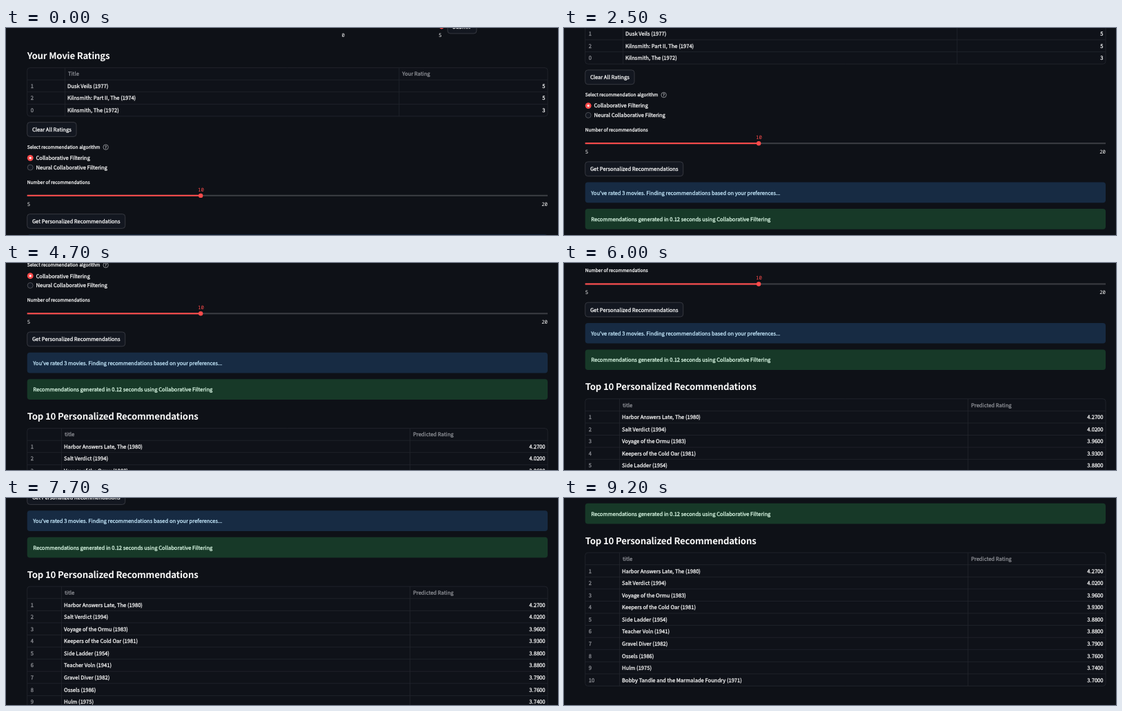
Animation, 800 px wide and 300 px high, one loop 9.9 s. Source, as an HTML page with a canvas:

```html
<!DOCTYPE html>
<html lang="en">
<head>
<meta charset="utf-8">
<title>Movie recommendations</title>
<style>
  html, body { margin: 0; width: 100%; height: 100%; overflow: hidden; background: #0e1117; }
  canvas { display: block; width: 800px; height: 300px; }
</style>
</head>
<body>
<canvas id="stage" width="800" height="300"></canvas>
<script>
const ctx = document.getElementById("stage").getContext("2d");

const LOOP = 9900, STEP = 100;
const SANS = '"Noto Sans CJK SC", "Noto Sans CJK JP", "Noto Sans CJK KR", "Noto Sans CJK TC", "Noto Sans CJK", "Open Sans", sans-serif';
const MONO = '"Noto Sans Mono", "DejaVu Sans Mono", monospace';
const BG = "#0e1117", PANEL = "#131720", WHITE = "#fafafa", MUTED = "#909298";
const RED = "#ff4b4b", LINE = "#22252d", EDGE = "#3a3d45";
const BODY = 7.59, SMALL = 6.64, ROW = 17.57;
const LEFT = 30.7, RIGHT = 785;

const rated = [
  ["1", "Dusk Veils (1977)", "5"],
  ["2", "Kilnsmith: Part II, The (1974)", "5"],
  ["0", "Kilnsmith, The (1972)", "3"]
];
const picks = [
  ["Harbor Answers Late, The (1980)", 4.27],
  ["Salt Verdict (1994)", 4.02],
  ["Voyage of the Ormu (1983)", 3.96],
  ["Keepers of the Cold Oar (1981)", 3.93],
  ["Side Ladder (1954)", 3.88],
  ["Teacher Voln (1941)", 3.88],
  ["Gravel Diver (1982)", 3.79],
  ["Ossels (1986)", 3.76],
  ["Hulm (1975)", 3.74],
  ["Bobby Tandle and the Marmalade Foundry (1971)", 3.7]
].map(([title, score], i) => [String(i + 1), title, score.toFixed(4)]);

// Scroll position: [time in ms, offset in px]
const keys = [
  [600, 0], [2500, 75.7], [3800, 136.4], [4700, 169.6],
  [6000, 212.4], [7700, 281], [8600, 315.3], [9200, 330]
];

function slope(i) {
  const a = keys[Math.max(i - 1, 0)], b = keys[Math.min(i + 1, keys.length - 1)];
  return (b[1] - a[1]) / (b[0] - a[0]);
}

function scrollAt(t) {
  const last = keys.length - 1;
  if (t <= keys[0][0]) return 0;
  if (t >= keys[last][0]) return keys[last][1];
  const i = keys.findIndex(k => k[0] > t) - 1;
  const [t0, y0] = keys[i], [t1, y1] = keys[i + 1];
  const d = t1 - t0, u = (t - t0) / d, v = 1 - u;
  return y0 * v * v * (1 + 2 * u) + y1 * u * u * (3 - 2 * u)
    + d * u * v * (slope(i) * v - slope(i + 1) * u);
}

// y is the middle of the capitals; a thin outline strengthens small type
function text(str, x, y, { color = WHITE, size = BODY, weight = 400, family = SANS, align = "left", spacing = 0, outline = 0.28 } = {}) {
  ctx.font = `${weight} ${size}px ${family}`;
  ctx.letterSpacing = spacing + "px";
  ctx.textRendering = "geometricPrecision";
  ctx.textAlign = align;
  ctx.fillStyle = ctx.strokeStyle = color;
  const base = y + size * 0.375;
  ctx.fillText(str, x, base);
  if (outline) {
    ctx.lineWidth = outline;
    ctx.lineJoin = "round";
    ctx.strokeText(str, x, base);
  }
}

function box(x, y, w, h, fill, stroke) {
  ctx.beginPath();
  ctx.roundRect(x, y, w, h, 4);
  if (fill) { ctx.fillStyle = fill; ctx.fill(); }
  if (stroke) { ctx.strokeStyle = stroke; ctx.lineWidth = 0.9; ctx.stroke(); }
}

function disc(x, y, r, fill, stroke) {
  ctx.beginPath();
  ctx.arc(x, y, r, 0, Math.PI * 2);
  if (fill) { ctx.fillStyle = fill; ctx.fill(); }
  if (stroke) { ctx.strokeStyle = stroke; ctx.lineWidth = 0.8; ctx.stroke(); }
}

function bar(x, y, w, h, color) {
  ctx.fillStyle = color;
  ctx.fillRect(x, y, w, h);
}

function heading(str, y) {
  text(str, LEFT, y, { size: 13.2, weight: 600, spacing: -0.17, outline: 0 });
}

function button(label, x, y, w) {
  box(x, y, w, 20.8, PANEL, EDGE);
  text(label, x + 7.2, y + 10.5);
}

function mono(str, x, y, align, color) {
  text(str, x, y, { family: MONO, size: 7.4, align, color, outline: 0 });
}

function alertBox(str, y, fill, color) {
  box(LEFT, y, RIGHT - LEFT, 29.7, fill);
  text(str, 39.2, y + 15.2, { color });
}

function table(y, col1, col2, head, rows) {
  const h = ROW * (rows.length + 1), w = RIGHT - LEFT;
  box(LEFT, y, w, h, "#0f1219", LINE);
  for (let i = 1; i <= rows.length; i++) bar(LEFT, y + ROW * i - 0.4, w, 0.8, LINE);
  for (const x of [col1, col2]) bar(x - 0.4, y, 0.8, h, LINE);
  text(head[0], col1 + 4.5, y + 8.9, { color: MUTED });
  text(head[1], col2 + 4.5, y + 8.9, { color: MUTED });
  rows.forEach(([id, title, value], i) => {
    const mid = y + ROW * (i + 1) + 8.9;
    text(id, 35.7, mid, { color: MUTED });
    text(title, col1 + 3.6, mid);
    text(value, 781.5, mid, { align: "right" });
  });
}

function radio(label, y, on) {
  if (on) {
    disc(35.2, y, 4.4, RED);
    disc(35.2, y, 1.6, WHITE);
  } else {
    disc(35.2, y, 4, PANEL, "#5a5c63");
  }
  text(label, 43.5, y);
}

function page() {
  mono("0", 488.6, 10, "center");
  mono("5", 629.2, 10, "center");
  disc(631.3, -1.8, 3.2, RED);
  button("Submit", 640, -12.8, 42);

  heading("Your Movie Ratings", 40.2);
  table(57.6, 85.5, 569.8, ["Title", "Your Rating"], rated);
  button("Clear All Ratings", LEFT, 136.6, 71.3);

  text("Select recommendation algorithm", LEFT, 172.6, { size: SMALL });
  disc(144.6, 172.7, 3.7, null, "#a4a6aa");
  text("?", 144.6, 172.8, { size: 5.6, align: "center", color: "#b4b6ba" });
  radio("Collaborative Filtering", 188.3, true);
  radio("Neural Collaborative Filtering", 202.1, false);

  text("Number of recommendations", LEFT, 223.1, { size: SMALL });
  mono("10", 282.4, 234, "center", RED);
  bar(LEFT, 241.8, RIGHT - LEFT, 2.1, "#3a3c42");
  bar(LEFT, 241.8, 251.5, 2.1, RED);
  disc(282.2, 242.9, 3.2, RED);
  mono("5", LEFT, 254.9, "left");
  mono("20", RIGHT, 254.9, "right");
  button("Get Personalized Recommendations", LEFT, 269.6, 142);

  alertBox("You've rated 3 movies. Finding recommendations based on your preferences...", 299.3, "#172b43", "#c7ebff");
  alertBox("Recommendations generated in 0.12 seconds using Collaborative Filtering", 337.8, "#173928", "#dffde9");

  heading("Top 10 Personalized Recommendations", 391.7);
  table(409.2, 80.5, 585.5, ["title", "Predicted Rating"], picks);
}

function draw(now) {
  const t = Math.floor((now % LOOP) / STEP) * STEP;
  ctx.setTransform(1, 0, 0, 1, 0, 0);
  bar(0, 0, 800, 300, BG);
  ctx.translate(0, -scrollAt(t));
  page();
  requestAnimationFrame(draw);
}
requestAnimationFrame(draw);
</script>
</body>
</html>
```
